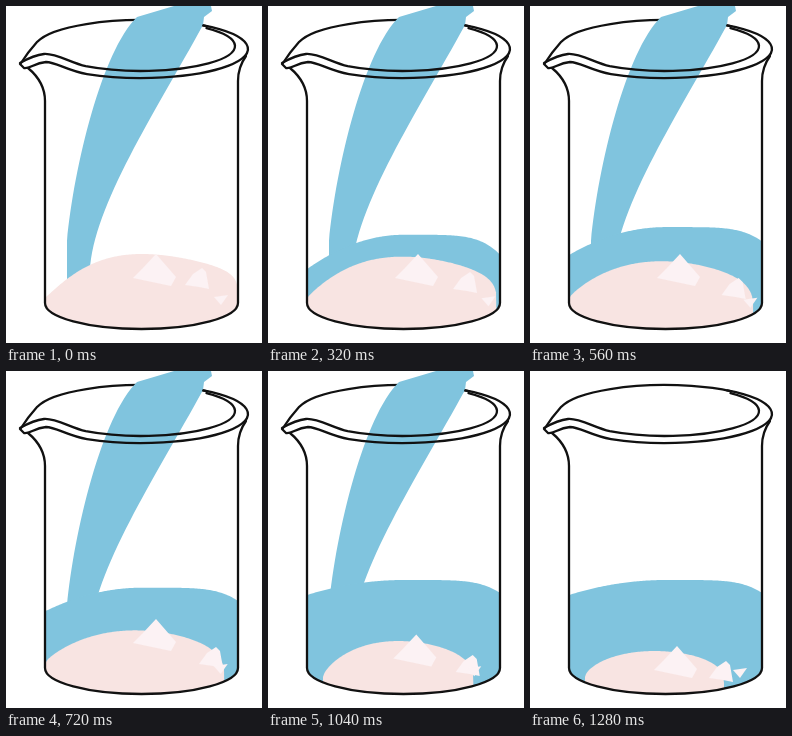
An HTML page with a canvas that plays this animation: 256x337 px, repeating every 1.36 s.

```html
<!DOCTYPE html>
<html lang="en">
<head>
<meta charset="utf-8">
<title>Filling beaker</title>
<style>
  html, body { margin: 0; width: 100%; height: 100%; overflow: hidden; background: #fff; }
  canvas { display: block; }
</style>
</head>
<body>
<canvas id="stage" width="256" height="337"></canvas>
<script>
const ctx = document.getElementById('stage').getContext('2d');
const STEP = 80, STEPS = 17, POUR_END = 14;
const BLUE = '#80c4de', PINK = '#f8e4e2', PALE = '#fcf2f4', INK = '#111';
const LEFT = 39, RIGHT = 232, BASE = 297, MIDDLE = (LEFT + RIGHT) / 2;

const lerp = (a, b, p) => a + (b - a) * p;
// Progress from 0 to 1 between two steps
const phase = (step, from, to) => Math.min(1, Math.max(0, (step - from) / (to - from)));

// Fills below a surface whose height depends on u, from -1 (left) to 1 (right)
function fillBelow(left, right, height, color) {
  ctx.beginPath();
  ctx.moveTo(left, 330);
  for (let x = left; x <= right; x++) {
    ctx.lineTo(x, height(lerp(-1, 1, (x - left) / (right - left))));
  }
  ctx.lineTo(right, 330);
  ctx.fillStyle = color;
  ctx.fill();
}

function polygon(points, dx, dy) {
  ctx.beginPath();
  for (const [x, y] of points) ctx.lineTo(x + dx, y + dy);
  ctx.fillStyle = PALE;
  ctx.fill();
}

function drawStream() {
  ctx.beginPath();
  ctx.moveTo(131, 11);
  ctx.lineTo(168, 0);
  ctx.lineTo(205, 0);
  ctx.lineTo(206, 5);
  ctx.lineTo(198, 11);
  ctx.lineTo(197, 19);
  ctx.bezierCurveTo(150, 105, 87, 200, 84, 265);
  ctx.lineTo(61, 276);
  ctx.lineTo(61, 235);
  ctx.bezierCurveTo(68, 160, 96, 45, 131, 11);
  ctx.fillStyle = BLUE;
  ctx.fill();
}

function drawWater(step) {
  const rise = phase(step, 0, 13);
  if (rise === 0) return;
  const level = 248 - 39 * rise ** 0.6;
  const leftDrop = lerp(43, 15, rise);
  const rightDrop = 13 + 30 * (1 - rise) ** 4;
  fillBelow(LEFT, RIGHT,
    u => level + (u < 0 ? leftDrop * u ** 2 : rightDrop * u ** 5), BLUE);
}

// The mound sinks, narrows and becomes more even as it dissolves
function drawMound(step) {
  const p = phase(step, 0, 16), melt = p ** 1.8;
  const shrink = phase(step, 9, 13);
  const crest = 248 + 32 * melt;
  const leftEdge = 291 + 15 * shrink;
  const rightEdge = 292 + 20 * Math.min(1, p * 1.5);
  const roundness = lerp(0.65, 0.5, p), skew = lerp(0.35, 0.1, p);
  fillBelow(40 + 15 * shrink, 232 - 38 * melt, u => {
    const edge = lerp(leftEdge, rightEdge, (u + 1) / 2);
    const bulge = Math.max(0, 1 - u * u) ** (roundness - skew * u);
    return lerp(edge, crest, bulge);
  }, PINK);
}

function drawCrystals(step) {
  const sink = phase(step, 9, 16), slide = phase(step, 2, 16);
  polygon([[150, 248], [170, 271], [165, 280], [127, 272], [136, 263]],
    -3 * sink, 27 * sink);
  polygon([[196, 262], [200, 266], [203, 283], [193, 281], [179, 279], [187, 268]],
    14 * Math.sin(Math.PI * slide), 28 * slide);
  polygon([[208, 291], [222, 289], [215, 299]],
    7 * Math.sin(2 * Math.PI * slide) - 5 * slide ** 4, 8 * slide);
}

function bowl() {
  ctx.ellipse(MIDDLE, BASE, (RIGHT - LEFT) / 2, 26, 0, Math.PI, 0, true);
}

function drawContents(step) {
  ctx.save();
  ctx.beginPath();
  ctx.moveTo(LEFT, 90);
  bowl();
  ctx.lineTo(RIGHT, 90);
  ctx.clip();
  drawWater(step);
  drawMound(step);
  drawCrystals(step);
  ctx.restore();
}

function outerRim(from, to) {
  ctx.ellipse(135, 43, 107, 29, 0, from, to);
}

function drawBackRim() {
  ctx.beginPath();
  ctx.moveTo(15, 57);
  ctx.quadraticCurveTo(22, 46, 31, 36);
  outerRim(Math.PI + 0.25, 2 * Math.PI - 0.9);
  ctx.stroke();
}

function drawFrontRim() {
  ctx.beginPath();
  ctx.ellipse(135, 40, 94, 25, 0, -0.8, 2.2);
  ctx.bezierCurveTo(65, 57, 50, 47, 38, 48);
  ctx.quadraticCurveTo(28, 49, 14, 57);
  ctx.stroke();

  ctx.beginPath();
  outerRim(-0.95, 2.1);
  ctx.bezierCurveTo(62, 65, 50, 56, 40, 56);
  ctx.bezierCurveTo(28, 57, 24, 63, 18, 62);
  ctx.lineTo(14, 58);
  ctx.stroke();
}

function drawWalls() {
  ctx.beginPath();
  ctx.moveTo(22, 62);
  ctx.bezierCurveTo(34, 72, LEFT, 82, LEFT, 95);
  bowl();
  ctx.lineTo(RIGHT, 75);
  ctx.bezierCurveTo(RIGHT, 64, 235, 57, 240, 50);
  ctx.stroke();
}

function draw(step) {
  ctx.fillStyle = '#fff';
  ctx.fillRect(0, 0, 256, 337);
  ctx.strokeStyle = INK;
  ctx.lineWidth = 2.3;
  ctx.lineCap = ctx.lineJoin = 'round';
  drawBackRim();
  if (step < POUR_END) drawStream();
  drawContents(step);
  drawFrontRim();
  drawWalls();
}

const start = performance.now();
function tick(now) {
  draw(Math.floor(Math.max(0, now - start) / STEP) % STEPS);
  requestAnimationFrame(tick);
}
draw(0);
requestAnimationFrame(tick);
</script>
</body>
</html>
```
